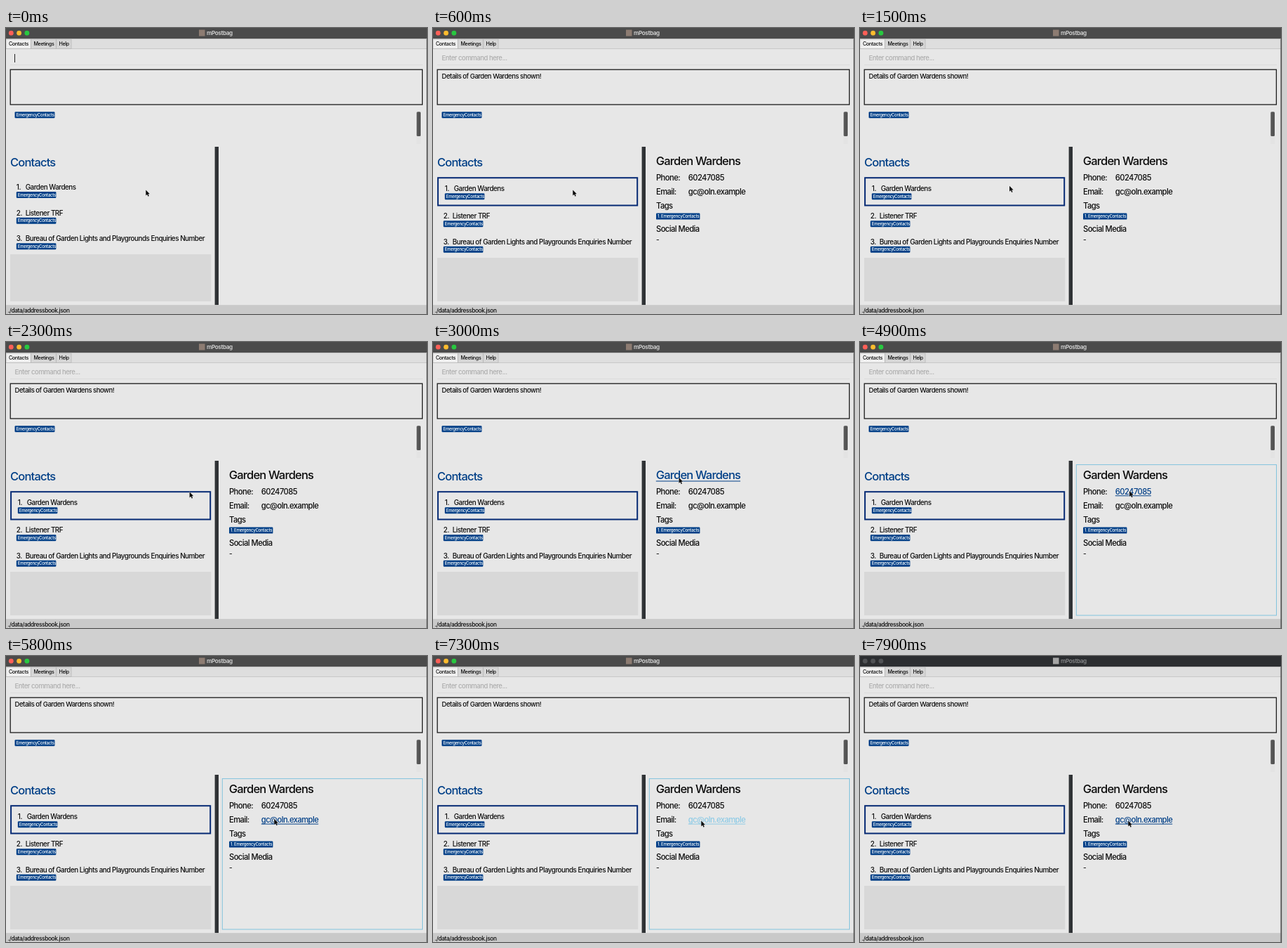
These frames come from a looping animation (600 by 407 pixels, 8 s). An HTML page:

```html
<!DOCTYPE html>
<html lang="en">
<head>
<meta charset="utf-8">
<title>Contact details</title>
<style>
html, body { margin: 0; width: 100%; height: 100%; overflow: hidden; background: #e7e7e7; }
svg { display: block; width: 600px; height: 407px; }
text { font-family: Inter, "Liberation Sans", sans-serif; font-weight: 480; letter-spacing: -.05em; white-space: pre; }
</style>
</head>
<body>
<svg id="stage" viewBox="0 0 600 407"></svg>
<script>
const NS = "http://www.w3.org/2000/svg";
const LOOP = 8000;
const INK = "#0c0c0c", BLUE = "#003f87", PRESSED = "#8ecbe6";
const BAR = "#4b4b4b", ICON = "#8d7c72", NAME = "#d6d6d6";
const stage = document.getElementById("stage");

function add(parent, tag, attrs, content) {
  const el = document.createElementNS(NS, tag);
  set(el, attrs);
  if (content) el.textContent = content;
  parent.appendChild(el);
  return el;
}
function set(el, attrs) {
  for (const k in attrs) el.setAttribute(k, attrs[k]);
}
const rect = (p, x, y, width, height, fill, more) =>
  add(p, "rect", { x, y, width, height, fill, ...more });
const text = (p, x, y, size, str, fill = INK, more) =>
  add(p, "text", { x, y, "font-size": size, fill, ...more }, str);
const group = (p = stage) => add(p, "g", {});
const show = (el, on) => el.setAttribute("visibility", on ? "visible" : "hidden");

function tag(p, x, y, label, width) {
  rect(p, x, y, width, 9, BLUE, { rx: 1.2 });
  text(p, x + 2, y + 6.7, 6.15, label, "#fff");
}

// Text that turns blue and underlined under the pointer
function link(p, x, y, size, str, gap) {
  const label = text(p, x, y, size, str);
  const line = add(p, "line", { x1: x, y1: y + gap, y2: y + gap, "stroke-width": 1 });
  return color => {
    line.setAttribute("x2", x + label.getComputedTextLength());
    label.setAttribute("fill", color || INK);
    line.setAttribute("stroke", color || "none");
  };
}

// Title bar
const bar = rect(stage, 0, 0, 600, 15.5, BAR);
const lights = ["#ff5f57", "#febc2e", "#28c840"];
const dots = lights.map((fill, i) =>
  add(stage, "circle", { cx: 7.3 + i * 11.3, cy: 7.2, r: 3.4, fill }));
const icon = rect(stage, 275, 2.5, 8.5, 9, ICON);
const title = text(stage, 286, 10.2, 8.2, "mPostbag", NAME, { style: "font-weight: 600" });

// Tabs
rect(stage, 0, 15.5, 600, 14.5, "#dedede");
rect(stage, 0, 29.2, 600, .8, "#c4c4c4");
[["Contacts", 0, 35.5], ["Meetings", 35.5, 36], ["Help", 71.5, 21.5]].forEach(([name, x, w], i) => {
  rect(stage, x, 16, w, 13.6, i ? "#d6d6d6" : "#efefef", { stroke: "#b2b2b2", "stroke-width": .7 });
  text(stage, x + 3.9, 25.2, 7.2, name);
});

// Command field and result box
rect(stage, 6, 52, 588, .8, "#d9d9d9");
const caret = rect(stage, 12, 37, 1, 12, "#222");
const prompt = text(stage, 12.6, 46.3, 9.5, "Enter command here...", "#adadad");
rect(stage, 6.2, 59.2, 587.2, 49.8, "#e7e7e7", { stroke: "#1c1c1c", "stroke-width": 1.3 });
const result = text(stage, 12.6, 72.3, 9.5, "Details of Garden Wardens shown!");

// Filter tags with scroll bar
tag(stage, 12.5, 119.3, "EmergencyContacts", 57);
rect(stage, 585, 119, 6.2, 46, "#e3e3e3");
rect(stage, 585.3, 119.3, 5.7, 34.7, "#555", { rx: 1.5 });

// Panes
rect(stage, 297.6, 169, 5.4, 225.2, "#2f3235");
text(stage, 6, 196.6, 16.5, "Contacts", BLUE);
const rest = rect(stage, 6, 322, 286.3, 67, "#d8d8d8");
const frame = rect(stage, 7.1, 213.2, 284.1, 39.3, "none", { stroke: "#062a74", "stroke-width": 2 });
const rows = ["Garden Wardens", "Listener TRF", "Bureau of Garden Lights and Playgrounds Enquiries Number"]
  .map((name, i) => {
    const g = group();
    text(g, 0, 0, 9.9, i + 1 + ".");
    text(g, 12.9, 0, 9.9, name);
    tag(g, 0, 2.8, "EmergencyContacts", 56.6);
    return g;
  });

// Details pane
const details = group();
const titleLink = link(details, 317.8, 195.2, 16.5, "Garden Wardens", 2.8);
text(details, 318, 216.6, 11.2, "Phone:");
const phoneLink = link(details, 363.8, 216.6, 11.2, "60247085", 2.2);
text(details, 318, 236.9, 11.2, "Email:");
const mailLink = link(details, 363.8, 236.9, 11.2, "gc@oln.example", 2.2);
text(details, 318, 257.4, 11.2, "Tags");
tag(details, 318, 263.6, "1. EmergencyContacts", 62.4);
text(details, 318, 289.8, 11.2, "Social Media");
text(details, 318, 305, 10, "-");
const focus = rect(stage, 308.3, 174.6, 285.2, 214.4, "none", { stroke: "#82c3dd", "stroke-width": 1 });

// Status bar and window edge
rect(stage, 0, 394.2, 600, 12.8, "#c9c9c9");
text(stage, 2.6, 405, 8.4, "./data/addressbook.json");
rect(stage, 599.3, 15.5, .7, 391.5, "#555");

const pointer = add(stage, "path", {
  d: "M0 0V8L1.9 6.3L3.2 9.2L4.5 8.6L3.2 5.8H5.6Z",
  fill: "#0a0a0a", stroke: "#f4f4f4", "stroke-width": .6, "paint-order": "stroke"
});

// Pointer stops: time, x, y
const path = [
  [0, 199.3, 230.5], [1000, 199.3, 230.5], [1400, 213, 224.7], [1900, 213, 224.7],
  [2900, 350.5, 193], [4200, 350.5, 193], [4700, 384, 212],
  [5300, 384, 212], [5700, 382.3, 232], [6400, 382.3, 232],
  [6700, 382.3, 234.5], [LOOP, 382.3, 234.5]
];
function pointerAt(t) {
  const i = path.findIndex(p => p[0] > t);
  const [t0, x0, y0] = path[i - 1], [t1, x1, y1] = path[i];
  const u = (t - t0) / (t1 - t0), e = u * u * (3 - 2 * u);
  return [x0 + (x1 - x0) * e, y0 + (y1 - y0) * e];
}

function draw(t) {
  const within = (a, b) => t >= a && t < b;
  const open = t >= 600, away = t >= 7600;

  show(caret, t < 300);
  [prompt, result, frame, details].forEach(el => show(el, open));
  const tops = open ? [232.4, 271.4, 307.9] : [230.2, 266.9, 303.4];
  rows.forEach((g, i) =>
    g.setAttribute("transform", `translate(${open && !i ? 16.8 : 14.8} ${tops[i]})`));
  set(rest, { y: open ? 327 : 322, height: open ? 62 : 67 });

  titleLink(within(2800, 4400) && BLUE);
  phoneLink(within(4600, 5400) && BLUE);
  mailLink(within(7200, 7500) ? PRESSED : t >= 5600 && BLUE);
  show(focus, t >= 3300 && !away);

  bar.setAttribute("fill", away ? "#2c2e31" : BAR);
  dots.forEach((d, i) => d.setAttribute("fill", away ? "#505255" : lights[i]));
  icon.setAttribute("fill", away ? "#a5a5a5" : ICON);
  title.setAttribute("fill", away ? "#858688" : NAME);

  pointer.setAttribute("transform", `translate(${pointerAt(t).join(" ")})`);
}

const start = performance.now();
function tick() {
  draw((performance.now() - start) % LOOP);
  requestAnimationFrame(tick);
}
tick();
</script>
</body>
</html>
```
